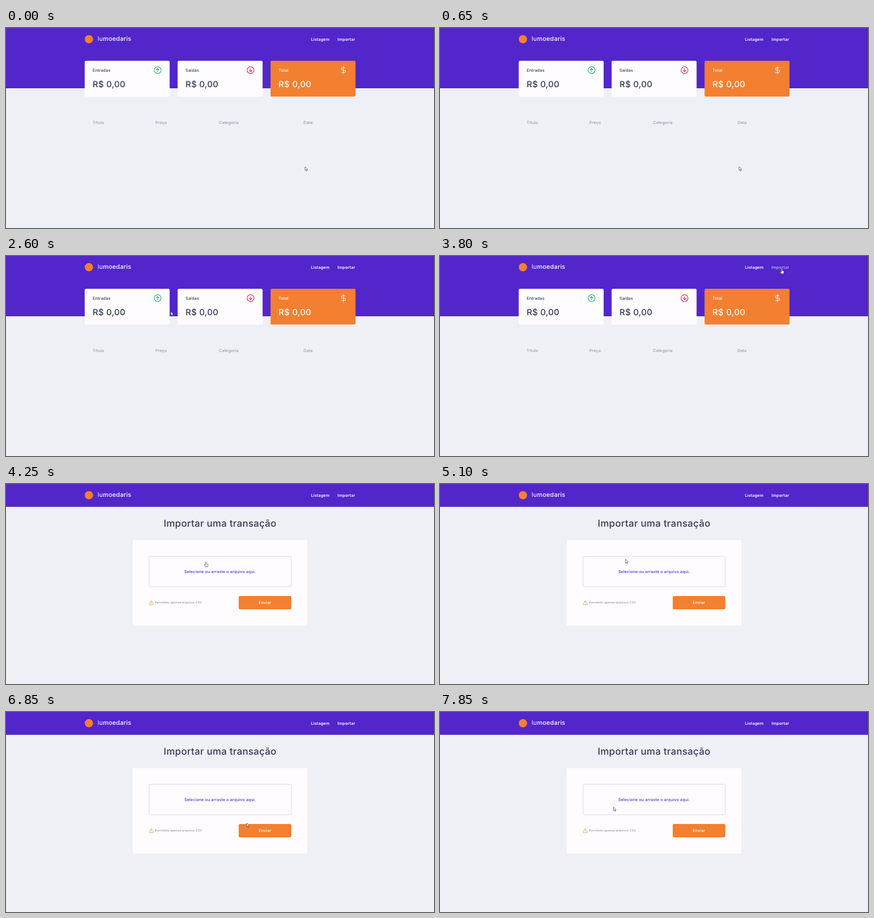
These frames come from a looping animation (800x375 px, 8000 ms). An HTML page:

```html
<!DOCTYPE html>
<html lang="pt-BR">
<head>
<meta charset="utf-8">
<title>Finanças</title>
<style>
  html, body { margin: 0; width: 100%; height: 100%; overflow: hidden; background: #eff0f5; }
  svg { display: block; width: 100vw; height: 100vh; }
  text {
    font: 500 7.6px Inter, "Open Sans", sans-serif;
    letter-spacing: .02em; fill: #35375c; text-rendering: geometricPrecision;
  }
  .purple { fill: #5226ca; }
  .orange { fill: #f28030; }
  .paper { fill: #fefcfe; }
  .white { fill: #fff; }
  .brand { font-size: 11.5px; }
  .light { font-weight: 400; }
  .strong { font-weight: 600; }
  .amount { font-size: 15.8px; }
  .heading { font-size: 17.75px; }
  .column { fill: #9a9ab0; }
  .link { font-size: 7.5px; fill: #5630c4; }
  .hint { font-size: 5.6px; fill: #9593a6; }
  .middle { text-anchor: middle; }
  .line { fill: none; stroke-linecap: round; stroke-linejoin: round; }
  .pointer { fill: #fff; stroke: #3a3a48; stroke-width: .7; stroke-linejoin: round; }
</style>
</head>
<body>
<svg viewBox="0 0 800 375" preserveAspectRatio="none">
  <rect width="800" height="375" fill="#eff0f5"/>

  <g id="list">
    <rect class="purple" width="800" height="113"/>
    <g id="cards"></g>
    <g class="columns">
      <text class="column" x="162" y="180">Título</text>
      <text class="column" x="279" y="180">Preço</text>
      <text class="column" x="398" y="180">Categoria</text>
      <text class="column" x="556" y="180">Data</text>
    </g>
  </g>

  <g id="import">
    <rect class="purple" width="800" height="42.8"/>
    <text class="heading middle" x="400.2" y="80">Importar uma transação</text>
    <rect class="paper" x="237" y="105.3" width="326.3" height="160.2" rx="2.3"/>
    <rect x="267.4" y="135.5" width="265.8" height="57.2" rx="2" fill="none"
          stroke="#aaa9b8" stroke-width=".7" stroke-dasharray="1.5 1"/>
    <text class="link middle" x="400.2" y="166.6">Selecione ou arraste o arquivo aqui.</text>
    <path class="line" stroke="#e8a04c" stroke-width=".9"
          d="M270.9 219.2L267.6 225.1Q267.2 226.2 268.3 226.3H274.9Q276 226.2 275.6 225.1L272.3 219.2Q271.6 218.3 270.9 219.2ZM271.6 221.3V223.2M271.6 224.7V224.75"/>
    <text class="hint" x="278.8" y="224.4">Permitido apenas arquivos CSV</text>
    <rect class="orange" x="435" y="210" width="98.3" height="25" rx="2.3"/>
    <text class="white middle" x="484" y="225.2">Enviar</text>
  </g>

  <circle class="orange" cx="155" cy="21" r="7.8"/>
  <text class="brand white" x="171.2" y="24.2"><tspan class="light">lu</tspan>moedaris</text>
  <text class="white strong" x="569.9" y="23.5">Listagem</text>
  <text id="importLink" class="white strong" x="619.8" y="23.5">Importar</text>

  <g id="cursor" class="pointer">
    <path id="arrow" d="M0 0V7.2L1.7 5.7 2.8 8.3 4 7.8 2.9 5.3H5Z"/>
    <path id="hand"
          d="M-.9.7Q0-.6.9.7V3.5L3.5 4.2Q4.2 4.5 4 5.4L3.3 9.3H-1L-3.3 6Q-3.2 4.9-2.1 5.2L-.9 6.2Z"/>
  </g>
</svg>

<script>
const LOOP = 8000;
const PAGE_CHANGE = 3900;
const HOVER_START = 3450;
const HOVER_END = 4700;
const byId = id => document.getElementById(id);

const ring = (color, turn) => `
  <g class="line" stroke="${color}" stroke-width="1.25" transform="rotate(${turn})">
    <circle r="6.4"/><path d="M0 3V-3M-2.6-.4L0-3 2.6-.4"/>
  </g>`;
const dollar = `<path class="line" stroke="#fff" stroke-width="1.6" transform="scale(.63) translate(-12 -12)"
  d="M12 1V23M17 5H9.5a3.5 3.5 0 0 0 0 7h5a3.5 3.5 0 0 1 0 7H6"/>`;

const cards = [
  { label: "Entradas", fill: "paper", ink: "", icon: ring("#25b56c", 0) },
  { label: "Saídas", fill: "paper", ink: "", icon: ring("#cc3560", 180) },
  { label: "Total", fill: "orange", ink: "white", icon: dollar }
];
byId("cards").innerHTML = cards.map(({ label, fill, ink, icon }, i) => `
  <g transform="translate(${147.1 + 173.7 * i} 61.6)">
    <rect class="${fill}" width="158.8" height="67" rx="2.3"/>
    <text class="${ink}" x="14.8" y="20.4">${label}</text>
    <text class="amount ${ink}" x="14.8" y="49.7">R$ 0,00</text>
    <g transform="translate(136.3 17.4)">${icon}</g>
  </g>`).join("");

const clamp = v => Math.min(1, Math.max(0, v));
const smooth = v => v * v * (3 - 2 * v);
const ramp = (time, start, length) => smooth(clamp((time - start) / length));

// The pointer rests briefly at each stop: arrival time and tip position
const stops = [
  { at: 1200, x: 559, y: 260 },
  { at: 2050, x: 225, y: 150 },
  { at: 2600, x: 308, y: 104 },
  { at: 2900, x: 680, y: 100 },
  { at: 3700, x: 639, y: 24 },
  { at: 4250, x: 373.7, y: 146 },
  { at: 4650, x: 480, y: 216 },
  { at: 5450, x: 256, y: 90 },
  { at: 5950, x: 241, y: 62 },
  { at: 6850, x: 450, y: 208 },
  { at: 7800, x: 324.3, y: 178 }
];

function tipAt(time) {
  const tip = { ...stops[0] };
  for (let i = 1; i < stops.length; i++) {
    const from = stops[i - 1], to = stops[i];
    // Leave the menu link only once the new page is there
    const start = Math.max(from.at, to.at > PAGE_CHANGE && from.at < PAGE_CHANGE ? PAGE_CHANGE : 0);
    const done = ramp(time, start, to.at - start);
    tip.x += (to.x - from.x) * done;
    tip.y += (to.y - from.y) * done;
  }
  return tip;
}

const show = (id, visible) => byId(id).setAttribute("opacity", visible ? 1 : 0);

function draw(now) {
  const time = now % LOOP;
  const { x, y } = tipAt(time);
  const hovering = time >= HOVER_START && time < HOVER_END;
  const dimmed = ramp(time, HOVER_START, 200) - ramp(time, PAGE_CHANGE, 200);

  show("list", time < PAGE_CHANGE);
  show("import", time >= PAGE_CHANGE);
  show("hand", hovering);
  show("arrow", !hovering);
  byId("importLink").setAttribute("opacity", 1 - .38 * dimmed);
  byId("cursor").setAttribute("transform", `translate(${x} ${y})`);
}

const begin = performance.now();
function tick() {
  draw(performance.now() - begin);
  requestAnimationFrame(tick);
}
tick();
</script>
</body>
</html>
```
